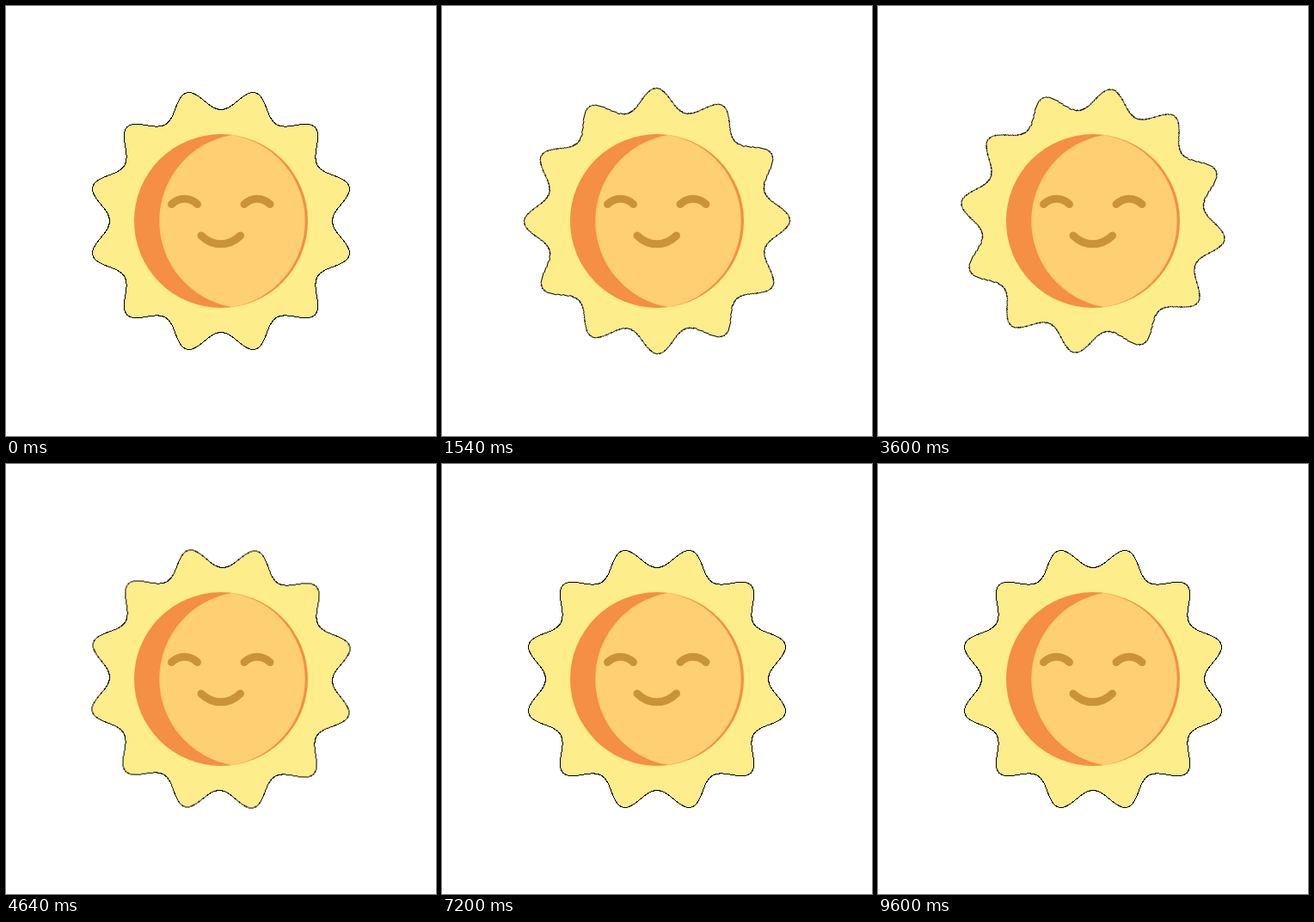
Recreate the animation shown at these times as an HTML page. Size 500 by 500 pixels, loop 9640 ms.

```html
<!DOCTYPE html>
<html lang="en">
<head>
<meta charset="utf-8">
<title>Smiling sun</title>
<style>
  html, body { margin: 0; width: 100%; height: 100%; overflow: hidden; background: #fff; }
  svg { display: block; width: 100%; height: 100%; }
  #rays { fill: #fded8b; stroke: #000; stroke-width: 1; shape-rendering: crispEdges; transform-origin: 250px 250px; }
  .features { fill: none; stroke: #cb9337; stroke-width: 9; stroke-linecap: round; }
</style>
</head>
<body>
<svg viewBox="0 0 500 500">
  <path id="rays"/>
  <circle cx="250" cy="250" r="101" fill="#f48f45"/>
  <path fill="#ffcf74" d="M263 149.9A101.5 101.5 0 0 0 263 350.1A101.5 101.5 0 0 0 263 149.9Z"/>
  <g class="features">
    <path d="M192.5 230.5C201 222 214 222 222.5 230.5"/>
    <path d="M277 230.5C285.5 222 298.5 222 307 230.5"/>
    <path d="M227 267C240 280 259.5 280 272.5 267"/>
  </g>
</svg>
<script>
  const LOOP = 9640, LAST = 9600, SWING = 2400, STEP = 20;
  const rays = document.getElementById('rays');

  // Twelve rays: a wave around the centre, its tips sharpened by a second harmonic.
  const points = Array.from({ length: 720 }, (_, i) => {
    const angle = i * Math.PI / 360;
    const radius = 141 - 12.4 * Math.cos(12 * angle) + Math.cos(24 * angle);
    const x = 250 + radius * Math.sin(angle);
    const y = 250 - radius * Math.cos(angle);
    return x.toFixed(2) + ' ' + y.toFixed(2);
  });
  rays.setAttribute('d', 'M' + points.join('L') + 'Z');

  const easing = 'cubic-bezier(.167, .167, .667, 1)';
  const swing = rays.animate([
    { transform: 'rotate(0deg)', easing },
    { transform: 'rotate(23deg)', easing },
    { transform: 'rotate(0deg)' }
  ], { duration: SWING, fill: 'both' });
  swing.pause();

  const start = performance.now();
  function draw() {
    const time = Math.min((performance.now() - start) % LOOP, LAST);
    swing.currentTime = Math.floor(time / STEP) * STEP % SWING;
    requestAnimationFrame(draw);
  }
  draw();
</script>
</body>
</html>
```
